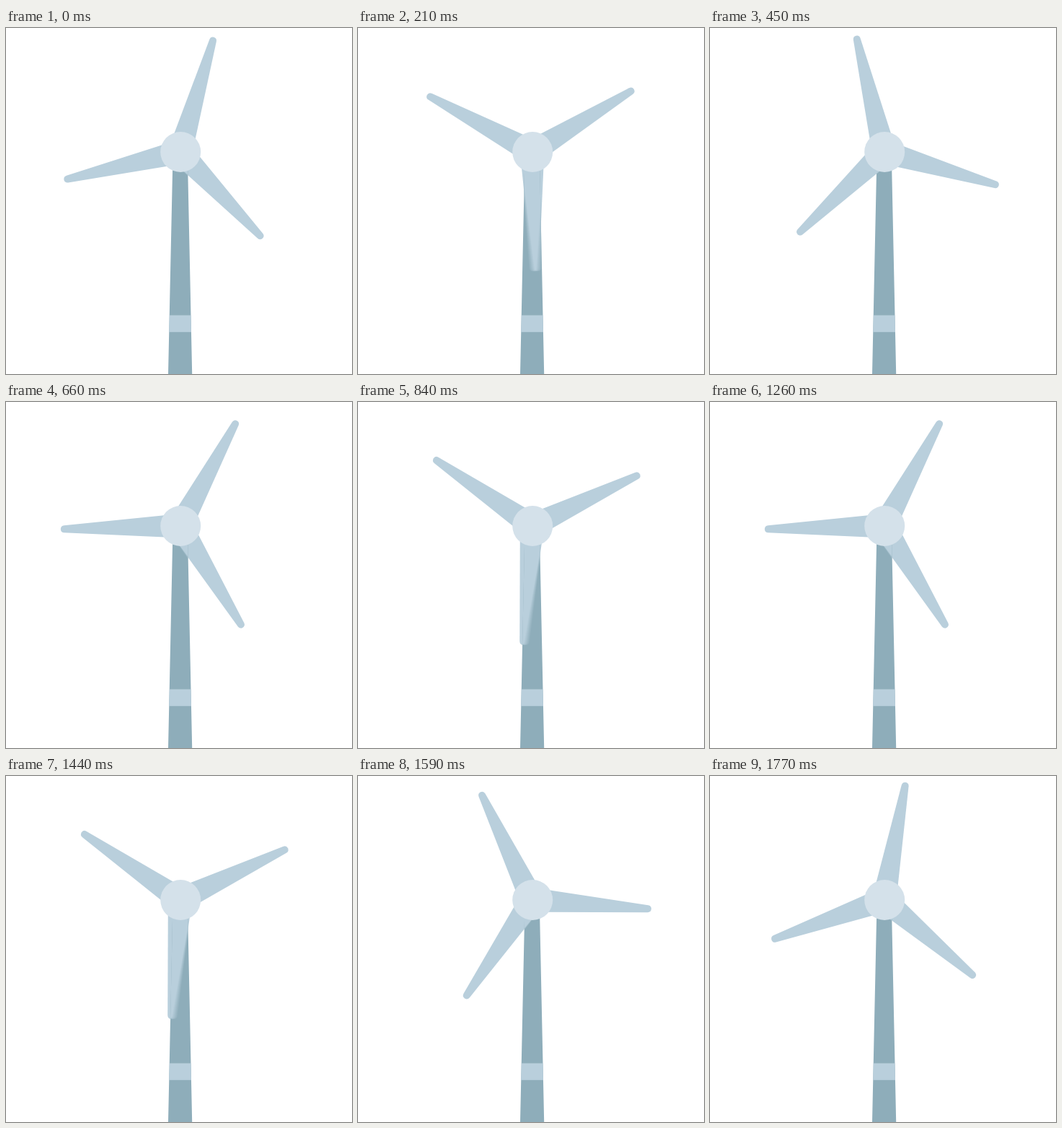
An HTML page with a canvas that plays this animation: 480x480 px, repeating every 1.8 s.

```html
<!DOCTYPE html>
<html lang="en">
<head>
<meta charset="utf-8">
<title>Wind turbine</title>
<style>
html, body { margin: 0; width: 100%; height: 100%; overflow: hidden; background: #fff; }
canvas { display: block; width: 480px; height: 480px; }
</style>
</head>
<body>
<canvas id="stage" width="480" height="480"></canvas>
<script>
const SIZE = 480, LOOP = 1800, STEP = 30;
const BLADE = '#b9cfdc', TOWER = '#8eadba', HUB = '#d4e1ea';
const CX = 241.6, CY = 171.8, START = 16.4;
const SHUTTER = 3, SAMPLES = 17; // motion blur in degrees

const ctx = document.getElementById('stage').getContext('2d');
const layer = document.createElement('canvas');
layer.width = layer.height = SIZE;
const blur = layer.getContext('2d');

const tower = new Path2D('M231.6 172 L252 172 L252.3 200 L258.2 480 L225 480 L231 200 Z');

// One blade pointing up from the origin, with a rounded tip
const blade = new Path2D();
blade.moveTo(-16.5, 0);
blade.lineTo(-15.2, -22);
blade.lineTo(-5, -161);
blade.quadraticCurveTo(-4.6, -165.6, 0, -165.8);
blade.quadraticCurveTo(4.6, -165.6, 5, -161);
blade.lineTo(15.2, -22);
blade.lineTo(16.5, 0);
blade.closePath();

function drawRotor(c, degrees) {
  for (let i = 0; i < 3; i++) {
    c.save();
    c.translate(CX, CY);
    c.rotate((degrees + i * 120) * Math.PI / 180);
    c.fill(blade);
    c.restore();
  }
}

function drawBlurred(degrees) {
  blur.globalCompositeOperation = 'source-over';
  blur.globalAlpha = 1;
  blur.clearRect(0, 0, SIZE, SIZE);
  blur.globalCompositeOperation = 'lighter';
  blur.globalAlpha = 1 / SAMPLES;
  blur.fillStyle = '#fff';
  for (let i = 0; i < SAMPLES; i++) {
    drawRotor(blur, degrees + ((i + 0.5) / SAMPLES - 0.5) * SHUTTER);
  }
  blur.globalAlpha = 1;
  blur.globalCompositeOperation = 'source-in';
  blur.fillStyle = BLADE;
  blur.fillRect(0, 0, SIZE, SIZE);
}

function draw(ms) {
  const t = Math.floor((ms % LOOP) / STEP) * STEP;
  const degrees = START + 360 * t / LOOP;

  ctx.fillStyle = '#fff';
  ctx.fillRect(0, 0, SIZE, SIZE);
  ctx.fillStyle = BLADE;
  drawRotor(ctx, degrees);

  // Blades are sharp on the sky and soft in front of the tower
  ctx.fillStyle = TOWER;
  ctx.fill(tower);
  drawBlurred(degrees);
  ctx.save();
  ctx.clip(tower);
  ctx.drawImage(layer, 0, 0);
  ctx.fillStyle = BLADE;
  ctx.fillRect(220, 398.5, 44, 23.3);
  ctx.restore();

  ctx.fillStyle = HUB;
  ctx.beginPath();
  ctx.arc(242.2, 172, 28, 0, Math.PI * 2);
  ctx.fill();
}

let start = null;
function tick(now) {
  if (start === null) start = now;
  draw(now - start);
  requestAnimationFrame(tick);
}
draw(0);
requestAnimationFrame(tick);
</script>
</body>
</html>
```
